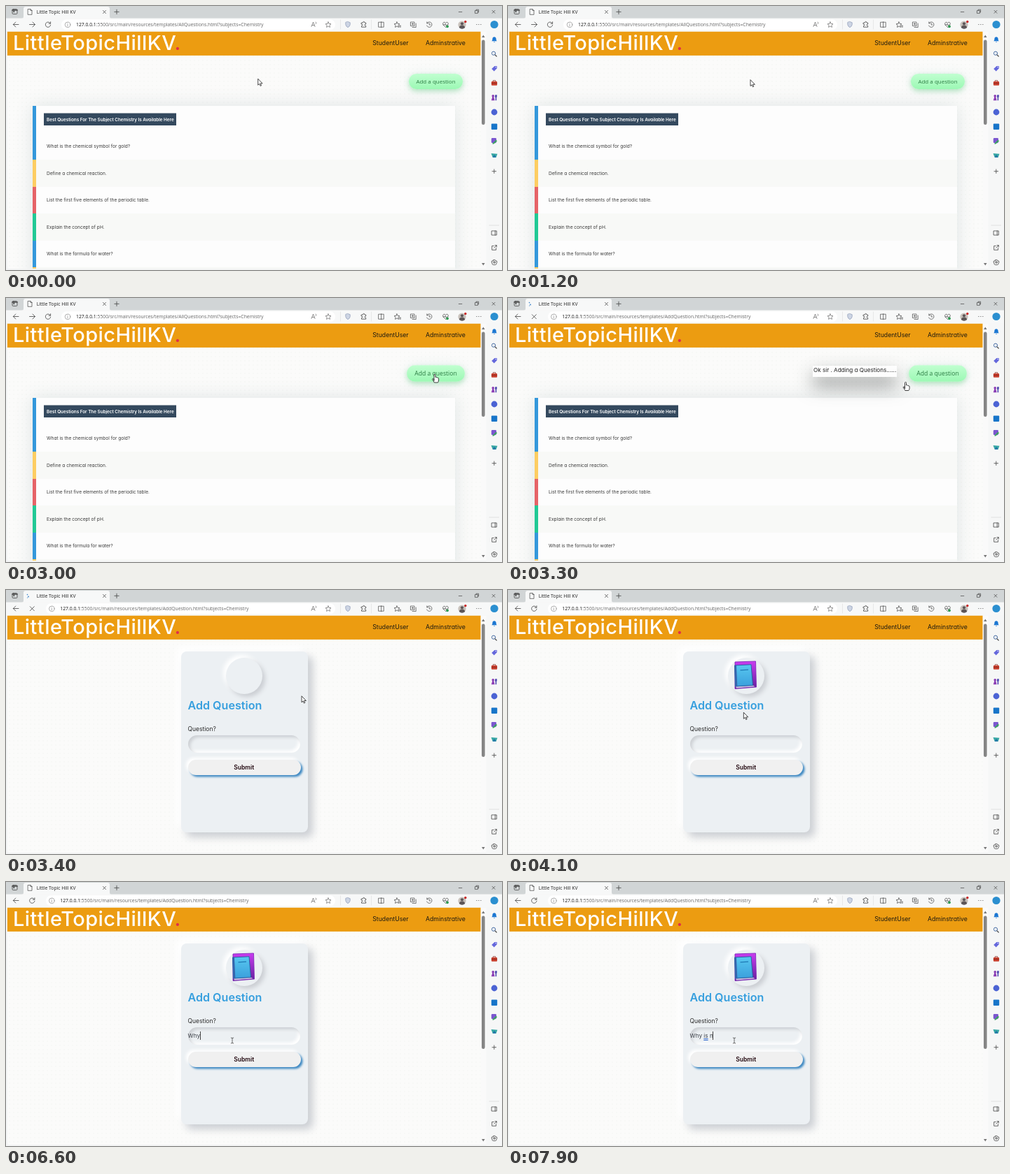
An HTML page that plays this animation: 708x378 px, repeating every 8000 ms.

```html
<!DOCTYPE html>
<html lang="en">
<head>
<meta charset="utf-8">
<title>Little Topic Hill KV</title>
<style>
html, body { margin: 0; width: 100%; height: 100%; overflow: hidden; }
#stage { position: relative; width: 708px; height: 378px; overflow: hidden; background: #f6f7f7; }
#stage > svg, .scene, .scene > svg { position: absolute; left: 0; top: 0; width: 708px; height: 378px; }
.scene { clip-path: inset(37px 30px 2px 2px round 0 0 0 4px); }
.scene div { position: absolute; box-sizing: border-box; }
text, .scene { font-family: Inter, "Open Sans", sans-serif; font-feature-settings: "cv11"; }
.ui text { font-family: "Open Sans", "Noto Sans", sans-serif; }
.ui .nav text { font-family: Inter, "Open Sans", sans-serif; }
.line { fill: none; stroke: #444; stroke-width: .8; stroke-linecap: round; stroke-linejoin: round; }
.back { left: 0; top: 0; width: 708px; height: 378px;
  background: radial-gradient(circle, #f7f8f6 .8px, transparent 1.2px) 2px 3px / 6px 6px, #fbfbfa; }
.list { left: 38px; top: 143px; width: 603px; height: 260px; background: #fdfdfd;
  box-shadow: 0 0 24px rgba(80,110,120,.17); }
.row { left: 38px; width: 603px; border-left: 5.5px solid; }
#add { left: 575px; top: 97px; width: 77px; height: 22px; border-radius: 11px;
  background: linear-gradient(#c0ffd0, #9cf8b4); box-shadow: 0 3px 7px rgba(90,200,120,.4), 0 0 16px rgba(140,190,190,.16);
  color: #2b7b43; font: 8px/21px "Open Sans", sans-serif; text-align: center; white-space: nowrap; }
#toast { left: 435px; top: 97px; width: 120px; height: 16px; padding-left: 1px; background: #fdfdfd;
  font-size: 8.1px; line-height: 13px; color: #222; white-space: nowrap;
  box-shadow: 0 14px 24px rgba(80,86,86,.5), 0 8px 28px rgba(80,86,86,.16); }
.card { left: 250px; top: 88px; width: 181px; height: 259px; border-radius: 8px; background: #ecf0f3;
  box-shadow: 7px 7px 12px #cbced3, -7px -7px 12px #fff; }
.disc { left: 314px; top: 97px; width: 52px; height: 52px; border-radius: 50%; background: #ecf0f3;
  box-shadow: 4px 4px 6px #cbced3, -4px -4px 6px #fff; }
.field { left: 260px; top: 208px; width: 160px; height: 25px; border-radius: 12.5px; background: #ecf0f3;
  box-shadow: inset 3px 3px 4px #cdd0d4, inset -3px -3px 4px #fff; }
.submit { left: 260px; top: 242.5px; width: 160.5px; height: 22px; border-radius: 11px; background: #f0f0f0;
  box-shadow: 2.5px 2.5px 3px #3d88c2, -3px -3px 4px #fff; }
#typed { left: 259.6px; top: 214px; height: 13px; font-size: 8.2px; line-height: 13px; color: #3d4149; white-space: pre; }
#typed i { display: inline-block; width: .7px; height: 11.5px; margin: 0 -.3px 0 -.4px; background: #444; vertical-align: -2.5px; }
#typed u { text-decoration: underline double #3a6fd0 .6px; text-underline-offset: 1px; }
</style>
</head>
<body>
<div id="stage">
  <div class="scene" id="listPage">
    <div class="back"></div>
    <div class="list"></div>
    <div id="rows"></div>
    <svg id="listText">
      <rect x="54" y="153.5" width="189" height="17.5" fill="#34495e"/>
      <text x="58" y="164.7" font-size="6.4" font-weight="600" letter-spacing="-.04" fill="#fff">Best Questions For The Subject Chemistry Is Available Here</text>
    </svg>
    <div id="toast">Ok sir . Adding a Questions......</div>
    <div id="add">Add a question</div>
  </div>

  <div class="scene" id="formPage">
    <div class="back"></div>
    <div class="card"></div>
    <div class="disc"></div>
    <div class="field"></div>
    <div class="submit"></div>
    <svg>
      <defs>
        <linearGradient id="violet" x2="0" y2="1"><stop stop-color="#c93cf0"/><stop offset="1" stop-color="#64209c"/></linearGradient>
        <linearGradient id="sky" x2="0" y2="1"><stop stop-color="#58c8f0"/><stop offset="1" stop-color="#3a9fdc"/></linearGradient>
      </defs>
      <text x="259.5" y="171" font-size="16.1" font-weight="600" fill="#379fde">Add Question</text>
      <text x="259.5" y="201.5" font-size="8.5" fill="#2b2b2b">Question?</text>
      <text x="339.7" y="256.7" font-size="8.5" font-weight="600" fill="#20060d" text-anchor="middle">Submit</text>
      <g id="book" stroke-linejoin="round">
        <path d="M324 103L353.5 102 354.5 139 324 141.5Z" fill="url(#violet)" stroke="#7a22b4" stroke-width=".8"/>
        <path d="M325 138.2L350 136.8 352.5 138.3 326 140.4Z" fill="#cfc6e4"/>
        <path d="M323.5 108L347 106.8 349.5 136.5 324.5 138Z" fill="url(#sky)" stroke="#22609f" stroke-width=".9"/>
        <path d="M323.5 108L326 107.9 327.3 137.8 324.5 138Z" fill="#3465ad"/>
        <path d="M331.5 114.8L343 114.2" stroke="#1d78b4" stroke-width="1.2" fill="none"/>
      </g>
    </svg>
    <div id="typed"></div>
  </div>

  <svg>
    <rect x="1.7" y="36.5" width="676" height="34.4" fill="#ec9c11"/>
    <text id="logo" x="10" y="63.2" font-size="29" font-weight="500" letter-spacing=".45" fill="#fff">LittleTopicHillKV<tspan fill="#e0304a">.</tspan></text>
  </svg>

  <svg class="ui">
    <rect width="708" height="18" fill="#d1d5d6"/>
    <path d="M22 18Q25 18 25 15V4Q25 1 28 1H145Q148 1 148 4V15Q148 18 151 18Z" fill="#f7f8f8"/>
    <rect y="17.5" width="708" height="19" fill="#f7f8f8"/>
    <rect y="36" width="1.7" height="342" fill="#f3f4f4"/>
    <rect y="376" width="708" height="2" fill="#f3f4f4"/>
    <rect x="677.7" y="36.5" width="7.8" height="339.5" fill="#fafafa"/>
    <rect x="685.5" y="36" width="22.5" height="342" fill="#f6f7f7"/>
    <rect x="79" y="19.3" width="391" height="15" rx="7.5" fill="#fff" id="bar"/>
    <rect id="thumb" x="679" y="48.5" width="4.6" rx="2.3" fill="#858585"/>
    <path d="M679 45L681.3 41.5 683.6 45ZM679 368L681.3 371.5 683.6 368Z" fill="#777"/>

    <g class="line">
      <rect x="9" y="4.5" width="7" height="7" rx="1.3"/>
      <path d="M9 6H16M11.3 6.5V8.5" stroke-width="1.5"/>
      <path d="M138.5 6.5L142.5 10.5M142.5 6.5L138.5 10.5M154.8 8.4H161.2M158 5.2V11.6"/>
      <path d="M646.3 8.5H650.8M694 6.3L698 10.3M698 6.3L694 10.3M671 6.2V5.2H674.6V9H674M669.8 6.6H673.4V10.4H669.8Z" stroke-width=".7"/>
      <path d="M18 26.5H10.5M13.8 23L10.3 26.5 13.8 30"/>
      <path id="forward" d="M33.5 26.5H41.5M38 23L41.5 26.5 38 30"/>
      <path id="stop" d="M34.3 23.7L40.3 29.7M40.3 23.7L34.3 29.7"/>
      <path id="reload" d="M3.3 -1.8A3.7 3.7 0 1 0 3.7 .5M3.6 -4V-1.5H1.1"/>
      <path id="doc" d="M31.5 4.5H35L37 6.5V12.3H31.5ZM35 4.5V6.5H37" stroke-width=".7"/>
      <g id="info" stroke="#777" stroke-width=".6"><circle r="3.8"/><path d="M0 -.5V2M0 -2V-1.9"/></g>
      <g stroke="#666" stroke-width=".7">
        <path d="M436 29.5L438.5 23 441 29.5M437 27.5H440M442.3 23Q443.5 24.3 442.3 25.6"/>
        <path id="star" d="M460 22.8L461.2 25.4 464 25.7 461.9 27.6 462.5 30.4 460 29 457.5 30.4 458.1 27.6 456 25.7 458.8 25.4Z"/>
        <path d="M488 22.5L491.2 23.7V26.5Q491 29.2 488 30.7 485 29.2 484.8 26.5V23.7Z" fill="#cdd5e4" stroke="#8b99b5"/>
      </g>
      <path d="M477.5 20V33M521.5 20V33" stroke="#e2e2e2"/>
      <path d="M507.5 24H509.5Q509.5 22.3 510.7 22.3 511.9 22.3 511.9 24H513.7V26Q512 26 512 27.2 512 28.4 513.7 28.4V30.2H507.5V28.4Q509 28.3 509 27.2 509 26 507.5 26Z"/>
      <path d="M532 23.2H539.2V30.2H532ZM535.6 22.6V30.8" stroke-width=".7"/>
      <use href="#star" x="98" stroke-width=".7"/><path d="M561.3 28.2H563.5M561.8 30H563.5"/>
      <path d="M577.8 23H583V28.5H577.8ZM580 30.5H585.2V25M580.4 24.5V27M579.2 25.8H581.7" stroke-width=".7"/>
      <path d="M601 24.5A3.8 3.8 0 1 1 600.6 28M600.8 22.8V24.8H602.8M604.3 24.8V27H606" stroke-width=".7"/>
      <path d="M627.5 30.4L624 26.8Q622.8 24.5 624.8 23.3 626.6 22.7 627.5 24.5 628.4 22.7 630.2 23.3 632.2 24.5 631 26.8ZM624 27H626L627 25.5 628 28 629 27H630" stroke-width=".7"/>
    </g>
    <circle cx="630" cy="29.3" r="1.9" fill="#2c9b50"/>
    <circle cx="651" cy="27" r="5.6" fill="#c8c1bb"/>
    <path d="M646.8 31Q647.5 27.6 651 27.6 654.5 27.6 655.2 31 651 34.5 646.8 31Z" fill="#5d5658"/>
    <circle cx="651" cy="25.3" r="2.1" fill="#5d5658"/>
    <circle cx="655.8" cy="22.5" r="1.7" fill="#c92a2a"/>
    <path d="M671.7 26.5H672M674.7 26.5H675M677.7 26.5H678" class="line"/>
    <circle cx="697" cy="26.5" r="5.6" fill="#2b8fd0"/>

    <path d="M693.3 50.3Q694.4 49.5 694.4 47 694.6 44.2 697 44.2 699.3 44.2 699.6 47 699.6 49.5 700.7 50.3ZM695.8 51.2H698.2L697 52.2Z" fill="#1c77d2"/>
    <g class="line"><circle cx="696" cy="67.7" r="2.6" stroke="#4a6fa5" stroke-width="1"/><path d="M698 69.8L700.2 72" stroke-width="1.2"/></g>
    <path d="M693.2 90L697.4 86H700.8V89.3L696.7 93.4Z" fill="#6568dc"/><circle cx="699.2" cy="87.5" r=".7" fill="#fff"/>
    <path d="M695.2 108V106.7H698.8V108" fill="none" stroke="#8c2f27" stroke-width=".8"/><rect x="692.9" y="108" width="8.2" height="5.7" rx="1" fill="#c9402f"/><path d="M692.9 110.7H701.1" stroke="#7f2018" stroke-width=".8"/>
    <g fill="#8b3db5"><circle cx="695.2" cy="128.7" r="1.8"/><path d="M692.8 135.2L694.3 130H696.2L697.6 135.2Z"/></g>
    <path d="M698.2 127.2H700.8V130L700.2 131V135.2H698.6V131L697.8 130Z" fill="#4f4bb0"/>
    <circle cx="697" cy="152" r="4.4" fill="#4b63d4"/>
    <rect x="692.8" y="168.6" width="8.4" height="8.4" rx="1" fill="#1775c9"/>
    <rect x="692.8" y="189" width="7.2" height="7.2" rx="1.4" fill="#7b57cf"/><path d="M694 197.2L699.5 191.7 701.2 193.3 696 197.8Z" fill="#39a85a"/>
    <path d="M692.5 211L701.5 211.7 699.6 216.7H694.7Z" fill="#36a7a4"/><path d="M694.7 216.7L697 212.7 699.6 216.7Z" fill="#2272a8"/>
    <g class="line" stroke-width=".7">
      <path d="M694 236.7H699.6M696.8 233.9V239.5"/>
      <path d="M690 314H703.5" stroke="#d8d8d8"/>
      <path d="M693.5 322H700.3V328H693.5ZM698.2 322V328"/>
      <path d="M696.2 343.5H693.7V349.3H699.5V346.7M698 342.7H700.3V345M700.2 342.9L696.7 346.3"/>
      <path d="M695.8 363.6H698.2L698.9 364.9 700.4 365 701 367 700.1 368.1 700 369.6 698.4 370.6H695.6L694 369.6 693.9 368.1 693 367 693.6 365 695.1 364.9Z"/>
      <circle cx="697" cy="367" r="1.3"/>
    </g>
    <text x="43.7" y="10.6" font-size="6.8" fill="#222">Little Topic Hill KV</text>
    <g id="spin" fill="#3b83c9"><circle cx="30.5" cy="6.6" r=".8"/><circle cx="32" cy="9.5" r=".9"/><circle cx="30.5" cy="11" r=".6"/></g>
    <text id="url" y="29" font-size="6.8" fill="#666"><tspan fill="#111">127.0.0.1</tspan><tspan id="path"></tspan></text>
    <g class="nav" font-size="8.7" fill="#1d1a12">
      <text x="523.3" y="55.7">StudentUser</text>
      <text x="599" y="55.7">Adminstrative</text>
    </g>
  </svg>

  <svg>
    <g id="cursor" stroke-linejoin="round" stroke-linecap="round">
      <path id="arrow" d="M0 0V8.6L2 6.8 3.4 9.9 4.8 9.2 3.4 6.3H6Z" fill="#fff" stroke="#111" stroke-width=".75"/>
      <path id="hand" d="M-2 3V-5Q-2 -6 -1 -6 0 -6 0 -5V-1.6Q1.2 -2.4 1.8 -1.2 3 -1.8 3.4 -.6 4.6 -.9 4.6 .6V3Q4.4 5 3.4 6H-1.6Q-2.4 4.4 -4.4 1.6 -4.6 .3 -3.2 .6Z" fill="#fff" stroke="#111" stroke-width=".8"/>
      <path id="beam" d="M-1.7 -4Q0 -4 0 -3 0 -4 1.7 -4M0 -3V3M-1.7 4Q0 4 0 3 0 4 1.7 4" fill="none" stroke="#333" stroke-width=".7"/>
    </g>
  </svg>
</div>

<script>
const LOOP = 8000, TICK = 100;
const REQUEST = 3200, OPENED = 3400, LOADED = 3500;
const $ = id => document.getElementById(id);
const show = (id, on) => { $(id).style.display = on ? "" : "none"; };

// top, height, stripe colour, question
const rows = [
  [143, 77, "#3498db", "What is the chemical symbol for gold?"],
  [220, 38.5, "#fdcd62", "Define a chemical reaction."],
  [258.5, 38.5, "#e66367", "List the first five elements of the periodic table."],
  [297, 38.5, "#21c995", "Explain the concept of pH."],
  [335.5, 38.5, "#3498db", "What is the formula for water?"],
  [374, 38.5, "#fdcd62", ""]
];
rows.forEach(([top, height, color, label], i) => {
  const row = document.createElement("div");
  row.className = "row";
  row.style.cssText = `top:${top}px;height:${height}px;border-left-color:${color};background:${i % 2 ? "#f8f9f7" : "#fdfdfd"}`;
  $("rows").append(row);
  $("listText").insertAdjacentHTML("beforeend",
    `<text x="58" y="${203 + i * 38.5}" font-size="6.6" fill="#3a3a3a">${label}</text>`);
});

// time, x, y
const moves = [
  [0, 359.7, 104.6], [600, 359.7, 104.6], [700, 351, 100], [800, 340.5, 97.5], [900, 340.5, 97.5],
  [1000, 335.5, 96.6], [1100, 335.5, 96.6], [1200, 346, 106], [1300, 363, 120], [1400, 373.5, 129.5],
  [1500, 373.5, 129.5], [1600, 366.6, 127.6], [1700, 366.6, 127.6], [1800, 396, 138], [2000, 497.7, 160.4],
  [2200, 563, 163], [2400, 605, 132], [2600, 613, 115], [3200, 613, 115], [3300, 568.5, 126.5],
  [3400, 422, 152.2], [3600, 371, 142], [3800, 343, 137], [3900, 343, 137],
  [4200, 333, 195], [4400, 323, 227], [8000, 323, 227]
];

// time, text (marked word in <u>), caret
const typing = [
  [0, "", 0], [4300, "", 1], [4800, "", 0], [5300, "W", 1], [5800, "W", 0], [6300, "W", 1],
  [6400, "Wh", 1], [6600, "Why", 1], [6800, "Why ", 1], [7100, "<u>Why</u> ", 1],
  [7300, "Why i", 1], [7400, "Why is", 1], [7500, "Why is ", 1], [7600, "Why <u>is</u> ", 1],
  [7900, "Why <u>is</u> n", 1]
];

function pointAt(t) {
  const i = Math.max(1, moves.findIndex(m => m[0] >= t));
  const [t0, x0, y0] = moves[i - 1], [t1, x1, y1] = moves[i];
  const k = (t - t0) / (t1 - t0);
  return [x0 + (x1 - x0) * k, y0 + (y1 - y0) * k];
}

let last = -1;
function draw(t) {
  if (t === last) return;
  last = t;
  const opened = t >= OPENED, requested = t >= REQUEST, loading = requested && t < LOADED;

  show("listPage", !opened);
  show("formPage", opened);
  show("toast", t >= 3100);
  show("book", t >= LOADED);
  const grow = Math.min(1, Math.max(0, (t - 2400) / 200));
  $("add").style.transform = `scale(${1 + .075 * grow})`;
  $("thumb").setAttribute("height", opened ? 190.5 : 121.5);

  show("forward", !requested);
  show("stop", loading);
  show("reload", !loading);
  show("spin", loading);
  show("doc", !loading);
  $("reload").setAttribute("transform", `translate(${requested ? 37.3 : 60} 26.7)`);
  $("info").setAttribute("transform", `translate(${requested ? 65.3 : 88} 26.8)`);
  $("bar").setAttribute("x", requested ? 57 : 79);
  $("bar").setAttribute("width", requested ? 413 : 391);
  $("url").setAttribute("x", requested ? 77.3 : 100);
  $("path").textContent = `:5500/src/main/resources/templates/${requested ? "AddQuestion" : "AllQuestions"}.html?subjects=Chemistry`;

  const [, text, caret] = typing.filter(s => s[0] <= t).pop();
  $("typed").innerHTML = text + (caret ? "<i></i>" : "");

  const [x, y] = pointAt(t);
  const hand = t >= 2500 && !opened, beam = opened && y > 208;
  show("hand", hand);
  show("beam", beam);
  show("arrow", !hand && !beam);
  $("cursor").setAttribute("transform", `translate(${x} ${y})`);
}

const start = performance.now();
function frame() {
  const t = (performance.now() - start) % LOOP;
  draw(Math.floor(t / TICK) * TICK);
  requestAnimationFrame(frame);
}
frame();
</script>
</body>
</html>
```
